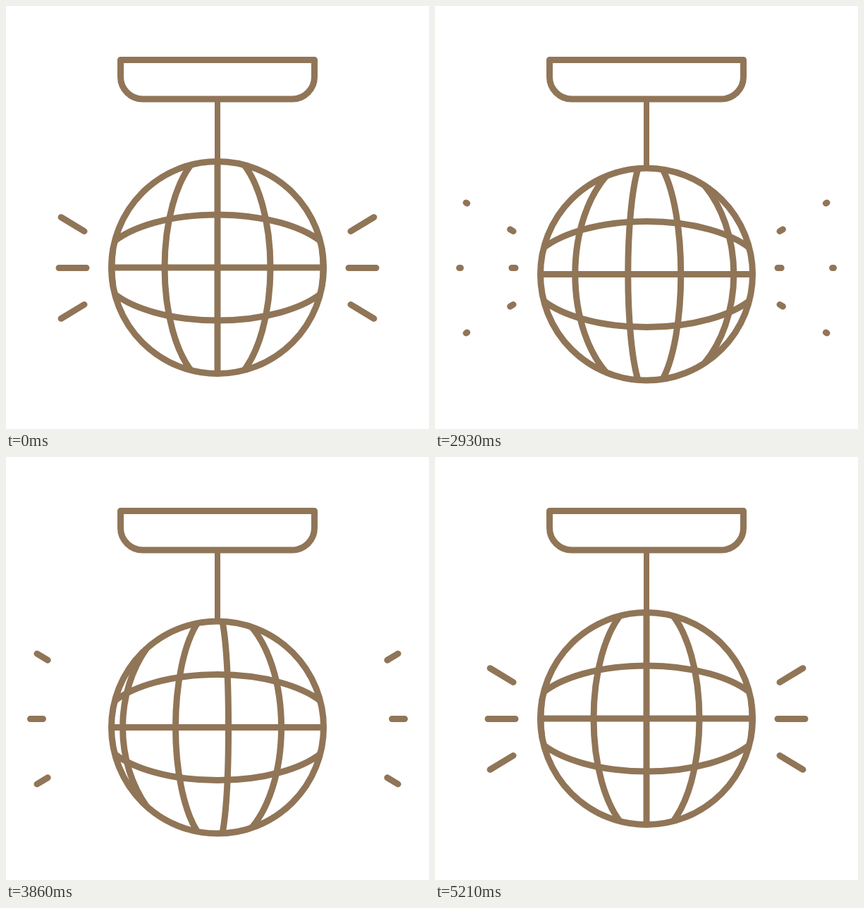
These frames come from a looping animation (600 px wide and 600 px high, 5240 ms). An HTML page:

```html
<!DOCTYPE html>
<html lang="en">
<head>
<meta charset="utf-8">
<title>Mirror ball</title>
<style>
  html, body { margin: 0; width: 100%; height: 100%; overflow: hidden; background: #fff; }
  svg { display: block; width: 100vw; height: 100vh; }
  path, circle { fill: none; stroke: #907557; stroke-width: 9; stroke-linecap: round; stroke-linejoin: round; }
  #cord { stroke-width: 8; }
  #cord, #ball path { stroke-linecap: butt; }
</style>
</head>
<body>
<svg viewBox="0 0 600 600">
  <path d="M162.5 76.5H437.5V100.5A31.5 31.5 0 0 1 406 132H194A31.5 31.5 0 0 1 162.5 100.5Z"/>
  <path id="cord"/>
  <g id="ball">
    <circle r="150.5"/>
    <path id="parallels"/>
    <path id="meridians"/>
  </g>
  <path id="rays"/>
</svg>
<script>
const LOOP = 5240, HOLD = 2030, STEP = 30, MOVE = 3210;
const R = 150.5, GAP = 75, POLE = 168.6;
const DROP = 14.6, BOUNCES = 2, TURN = 6 * GAP;
const REST = 0.49, GROW = 0.66, PASS = 540, RAMP = 1050, PASSES = 4;
const el = id => document.getElementById(id);

// Two bounces, the second one settling slowly
function bob(s) {
  const eased = s + s * (1 - s) * (0.2 + 0.2 * s + 0.4 * s * s);
  return DROP * Math.sin(Math.PI * BOUNCES * eased) ** 2;
}

// Turns fastest halfway through
function spin(s) {
  return TURN * (s - Math.sin(2 * Math.PI * s) / (4 * Math.PI) + 0.06 * s * (1 - s));
}

// Ray passes: speed up, cruise, then brake while the last rays grow
function rayPhase(time) {
  if (time < RAMP) return time * time / (2 * RAMP * PASS);
  const brake = PASSES - 1 + GROW;
  const cruise = (time - RAMP / 2) / PASS;
  if (cruise < brake) return cruise;
  const brakeTime = brake * PASS + RAMP / 2;
  const left = (MOVE - time) / (MOVE - brakeTime);
  return PASSES - (1 - GROW) * left ** 4;
}

// Part of an ellipse of half-width |u| that lies inside the ball
function arc(u, flat) {
  const y = Math.sqrt((R * R - u * u) / (1 - (u / POLE) ** 2));
  const x = Math.sign(u) * Math.sqrt(Math.max(0, R * R - y * y));
  const pair = (a, b) => flat ? `${b} ${a}` : `${a} ${b}`;
  const sweep = (u > 0) !== flat ? 1 : 0;
  return `M${pair(x, -y)}A${pair(Math.abs(u), POLE)} 0 0 ${sweep} ${pair(x, y)}`;
}

function meridians(turn) {
  let d = '';
  for (let u = -2 * GAP - turn % GAP; u < R; u += GAP)
    if (u > -R) d += arc(u, false);
  return d;
}

// All six rays between fractions a and b of their full reach
function raySpan(a, b) {
  let d = '';
  for (const side of [-1, 1])
    for (const row of [-1, 0, 1]) {
      const x = row ? 189 : 186, dx = row ? 67 : 79.5;
      const pt = f => `${300 + side * (x + dx * f)} ${371.5 + row * (52 + 40.5 * f)}`;
      d += `M${pt(a)}L${pt(b)}`;
    }
  return d;
}

function rays(phase) {
  const p = phase % 1;
  let d = '';
  if (p < 0.78) {
    const head = REST + (1 - REST) * Math.sin(Math.min(p / 0.28, 1) * Math.PI / 2);
    const tail = 1 - (1 - p / 0.9) ** 2;
    d += raySpan(Math.min(tail, head), head);
  }
  if (p > GROW) d += raySpan(0, REST * ((p - GROW) / (1 - GROW)) ** 1.7 + 0.001);
  return d;
}

function draw(now) {
  const t = now % LOOP;
  const time = t < HOLD ? 0 : (Math.floor((t - HOLD) / STEP) + 1) * STEP;
  const s = time / MOVE, y = 371 + bob(s);
  el('ball').setAttribute('transform', `translate(300 ${y})`);
  el('cord').setAttribute('d', `M300 132V${y - R}`);
  el('meridians').setAttribute('d', meridians(spin(s)));
  el('rays').setAttribute('d', rays(rayPhase(time)));
}

el('parallels').setAttribute('d', arc(-GAP, true) + arc(GAP, true) + `M${-R} 0H${R}`);
const begin = performance.now();
function tick() {
  draw(performance.now() - begin);
  requestAnimationFrame(tick);
}
tick();
</script>
</body>
</html>
```
